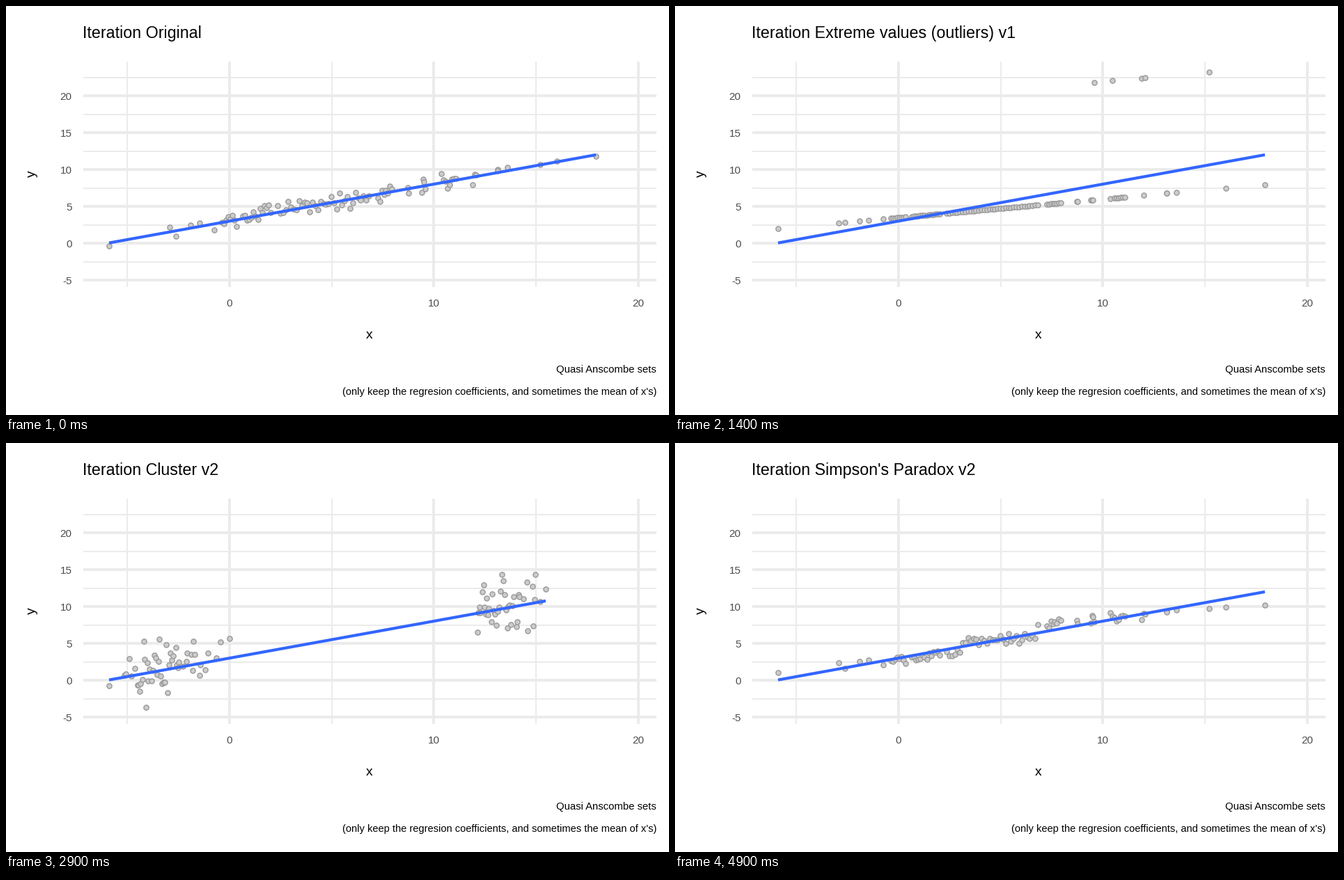
Write a matplotlib script that moves like this. It is 952 by 588 pixels and loops after 5000 ms.

```python
import numpy as np
import matplotlib.pyplot as plt
from matplotlib.animation import FuncAnimation

W, H, DPI = 952, 588, 100
GRID, TICK, BLUE = "#EBEBEB", "#4D4D4D", "#3366FF"
X_UNIT, Y_UNIT = 29.34, 10.6      # pixels per data unit
X_ZERO, Y_ZERO = 321.0, 341.1
LEFT, RIGHT, TOP, BOTTOM = 110.5, 933.5, 79.5, 404
X_MIN, X_MAX = 148, 847
SLOPE = 0.1812                    # fitted line, in pixels

plt.rcParams["font.family"] = "Liberation Sans"
rng = np.random.default_rng(7)


def fit(x):
    return 340.6 - SLOPE * (x - X_MIN)


def noise(n, sd, limit):
    return np.clip(rng.normal(0, sd, n), -limit, limit)


# Lone points at both ends; evenly filled runs (start, end, count) between them.
LOW = [(148, 345), (235, 318), (244, 331), (265, 314.5), (277.5, 311.5), (299, 322)]
HIGH = [(706, 235), (706, 237), (720, 232), (767, 228), (791, 223), (847, 216)]
RUNS = [(310, 331, 8), (340, 380, 14), (390, 521, 35), (534, 554, 8),
        (577, 578, 2), (597, 602, 4), (625, 646, 8), (670, 675, 3)]

mid = np.concatenate([np.linspace(*run) for run in RUNS])
mid_y = fit(mid) + noise(len(mid), 7.5, 13)
x, y = np.vstack([LOW, np.column_stack([mid, mid_y]), HIGH]).T
n = len(x)
res = y - fit(x)
rank = np.arange(n) / (n - 1)


def wave():
    # The wobble crosses the fitted line at these data x values.
    nodes = [-8.5, -5.35, -3.05, 0, 2.55, 5.2, 7.55, 10.62, 13.35, 16, 18.05]
    half_turns = np.interp((x - X_ZERO) / X_UNIT, nodes, np.arange(-3, 8))
    return fit(x) - Y_UNIT * 2.1 * np.sin(np.pi * half_turns)


def outliers(members, jump):
    low = 320 - 0.0908 * (x - X_MIN)
    low[[np.abs(x - m).argmin() for m in members]] -= jump
    return low


def simpson(levels, slope, spread):
    group = np.digitize(x, [409.5, 519.5])
    centre = np.array([x[group == g].mean() for g in range(3)])
    return np.array(levels)[group] + slope * (x - centre[group]) + spread * res


right = np.zeros(n, bool)
right[len(LOW):1 - len(HIGH):2] = True


def squeeze(scale, shift):
    return X_MIN + scale * (x - X_MIN) + shift * right


tight, loose = squeeze(0.2482, 488.5), squeeze(0.30, 580.5)
scatter = noise(n, 23, 49)
tail = [600, 602, 625, 629, 632, 670, 672, 675, 706, 767]

# (title, x, y, right end of the fitted line)
STATES = [
    ("Original", x, y, X_MAX),
    ("No linear relationship v1", x,
     fit(x) - Y_UNIT * np.sin((x - X_ZERO) / X_UNIT), X_MAX),
    ("No linear relationship v2", x, wave(), X_MAX),
    ("Extreme values (outliers) v1", x, outliers(tail[1::2], 169), X_MAX),
    ("Extreme values (outliers) v2", x, outliers(tail, 85), X_MAX),
    ("Cluster v1", loose, fit(loose) + 0.7 * scatter, loose.max()),
    ("Cluster v2", tight, fit(tight) + scatter, tight.max()),
    ("Heteroskedasticity v1", x, fit(x) + 1.45 * rank * res, X_MAX),
    ("Heteroskedasticity v2", x, fit(x) + 9 * (1 - rank) ** 2 * res, X_MAX),
    ("Simpson's Paradox v1", x, simpson([319.8, 278.8, 245.8], SLOPE, 1.1), X_MAX),
    ("Simpson's Paradox v2", x, simpson([314.5, 281.8, 249], 0, 0.2), X_MAX),
]
ARRIVE = [0, 4, 9, 14, 19, 24, 29, 34, 38, 42, 46, 50]
LEAVE = [2] + [a + 3 for a in ARRIVE[1:-1]]
FRAMES = ARRIVE[-1]

fig = plt.figure(figsize=(W / DPI, H / DPI), dpi=DPI, facecolor="white")
ax = fig.add_axes([0, 0, 1, 1])
ax.set_xlim(0, W)
ax.set_ylim(H, 0)
ax.axis("off")


def pt(px):
    return px * 72 / DPI


def label(px, py, text, size, color="black", **kw):
    kw.setdefault("va", "baseline")
    return ax.text(px, py, text, fontsize=pt(size), color=color, **kw)


def grid(xs, ys, width):
    style = dict(color=GRID, lw=pt(width), solid_capstyle="butt", zorder=1)
    for v in xs:
        px = X_ZERO + v * X_UNIT
        ax.plot([px, px], [TOP, BOTTOM], **style)
    for v in ys:
        py = Y_ZERO - v * Y_UNIT
        ax.plot([LEFT, RIGHT], [py, py], **style)


grid([-5, 5, 15], np.arange(-2.5, 23, 5), 2)
grid([0, 10, 20], range(-5, 21, 5), 4)

for v in (0, 10, 20):
    label(X_ZERO + v * X_UNIT, 431.5, str(v), 15.2, TICK, ha="center")
for v in range(-5, 21, 5):
    label(94.5, Y_ZERO - v * Y_UNIT + 5.5, str(v), 15.2, TICK, ha="right")
label(522, 478.5, "x", 19.1, ha="center")
label(37, 241.5, "y", 19.1, ha="center", va="center", rotation=90)
label(933.5, 526.5, "Quasi Anscombe sets", 14.95, ha="right")
label(934, 559, "(only keep the regresion coefficients, "
      "and sometimes the mean of x's)", 14.67, ha="right")

title = label(110, 46, "", 23.25)
dots = ax.scatter(x, y, s=pt(7.2) ** 2, facecolor="#CCCCCC", edgecolor="#999999",
                  linewidth=pt(1.4), zorder=2)
line, = ax.plot([], [], color=BLUE, lw=pt(4.2), solid_capstyle="butt", zorder=3)


def draw(i):
    k = max(s for s in range(len(STATES)) if ARRIVE[s] <= i)
    a, b = STATES[k], STATES[(k + 1) % len(STATES)]
    t = max(0, i - LEAVE[k] + 1) / (ARRIVE[k + 1] - LEAVE[k] + 1)
    px, py, end = (u + (v - u) * t for u, v in zip(a[1:], b[1:]))
    title.set_text("Iteration " + (b if t > 0.5 else a)[0])
    dots.set_offsets(np.column_stack([px, py]))
    line.set_data([X_MIN, end], [fit(X_MIN), fit(end)])
    return title, dots, line


anim = FuncAnimation(fig, draw, frames=FRAMES, interval=100, repeat=True,
                     repeat_delay=0, blit=False)
plt.show()
```
